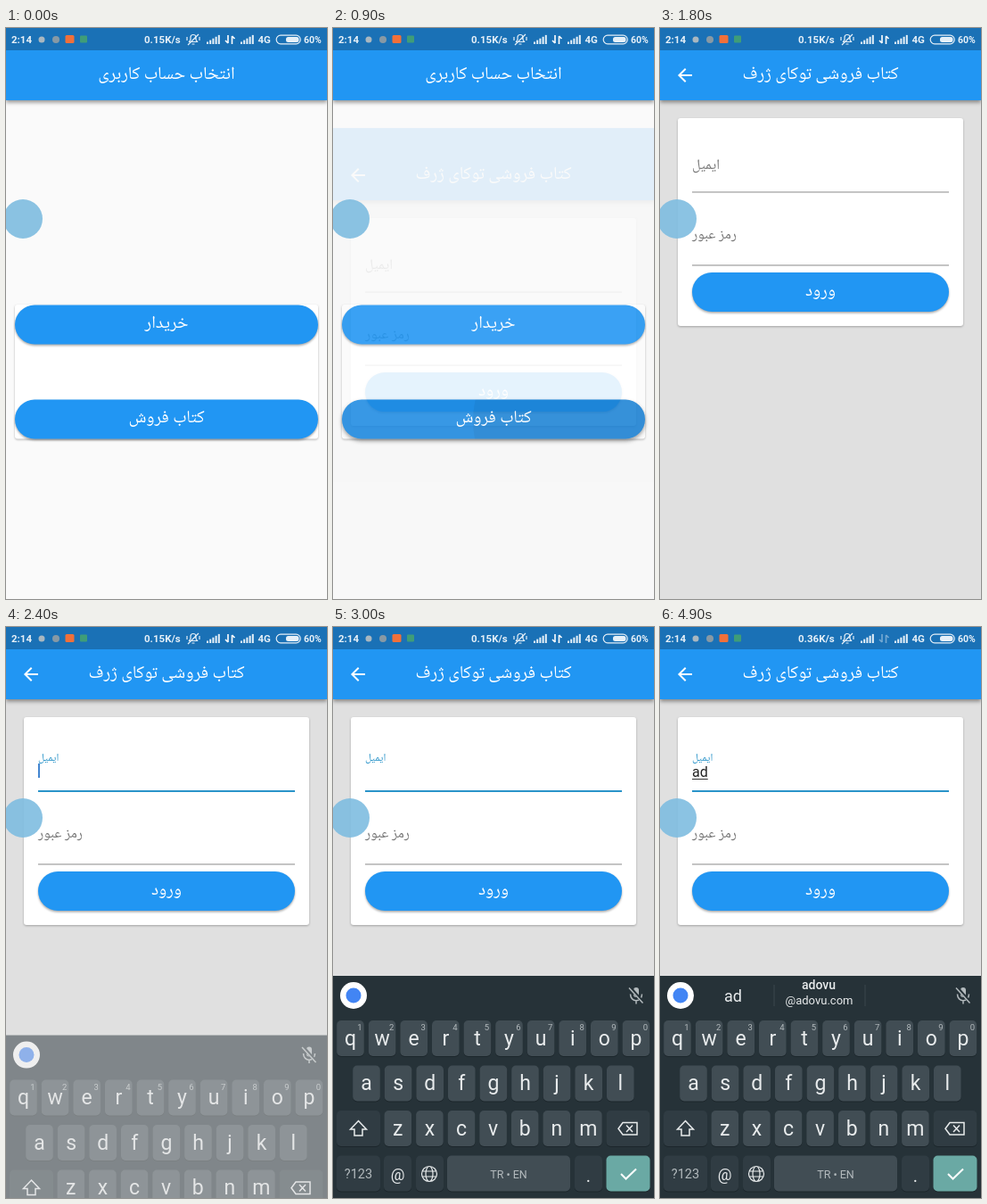
Write an HTML page that moves like this. It is 360 px wide and 640 px high and loops after 5000 ms.

```html
<!DOCTYPE html>
<html lang="fa">
<head>
<meta charset="utf-8">
<title>Login</title>
<style>
  html, body { margin: 0; width: 100%; height: 100%; overflow: hidden; background: #fafafa; }
  svg { display: block; width: 100vw; height: 100vh; }
  text { font-family: Roboto, "Noto Naskh Arabic", "Noto Sans Arabic", "Noto Sans", "DejaVu Sans", sans-serif; }
  .fa { font-family: "Noto Naskh Arabic", "Noto Sans Arabic", "Noto Sans", "DejaVu Sans", sans-serif; }
  .mid { text-anchor: middle; }
  filter { color-interpolation-filters: sRGB; }
</style>
</head>
<body>
<svg viewBox="0 0 360 640" xmlns="http://www.w3.org/2000/svg">
  <defs>
    <filter id="flat" x="-5%" y="-10%" width="110%" height="120%">
      <feDropShadow dx="0" dy="1" stdDeviation=".8" flood-opacity=".28"/>
    </filter>
    <filter id="low" x="-5%" y="-20%" width="110%" height="150%">
      <feDropShadow dx="0" dy="1.500" stdDeviation="1.300" flood-opacity=".35"/>
    </filter>
    <filter id="high" x="-5%" y="-30%" width="110%" height="180%">
      <feDropShadow dx="0" dy="2.500" stdDeviation="2.200" flood-opacity=".4"/>
    </filter>
    <clipPath id="pill"><rect x="10" y="416.500" width="340" height="44" rx="22"/></clipPath>
  </defs>

  <g id="chooser"></g>
  <g id="login"></g>
  <g id="keyboard"></g>
  <circle cx="19" cy="214" r="22" fill="#7fbde0" opacity=".9"/>
  <g id="status"></g>
</svg>
<script>
const LOOP = 5000;
const BLUE = '#2196f3', ACCENT = '#2a94c9';
const $ = id => document.getElementById(id);
const clamp = v => Math.min(1, Math.max(0, v));
const mix = (a, b, k) => a + (b - a) * k;
const during = (t, from, to) => t >= from && t < to;
const show = (id, on) => $(id).setAttribute('visibility', on ? 'visible' : 'hidden');

function bezier(x1, y1, x2, y2) {
  const at = (a, b, s) => 3 * (1 - s) ** 2 * s * a + 3 * (1 - s) * s * s * b + s ** 3;
  return x => {
    let lo = 0, hi = 1;
    for (let i = 0; i < 24; i++) {
      const m = (lo + hi) / 2;
      if (at(x1, x2, m) < x) lo = m; else hi = m;
    }
    return at(y1, y2, lo);
  };
}
const fastOutSlowIn = bezier(.4, 0, .2, 1);
const easeIn = bezier(.42, 0, 1, 1);

const rect = (x, y, w, h, fill, r = 0, extra = '') =>
  `<rect x="${x}" y="${y}" width="${w}" height="${h}" rx="${r}" fill="${fill}" ${extra}/>`;
const text = (x, y, size, fill, str, cls = '', extra = '') =>
  `<text x="${x}" y="${y}" font-size="${size}" fill="${fill}" class="${cls}" ${extra}>${str}</text>`;
const path = (d, fill, extra = '') => `<path d="${d}" fill="${fill}" ${extra}/>`;
const stroke = (d, color, width = 1.5) =>
  path(d, 'none', `stroke="${color}" stroke-width="${width}"`);

const appBar = title =>
  rect(0, 0, 360, 81, BLUE, 0, 'filter="url(#high)"') +
  text(180, 56.5, 20, '#fff', title, 'fa mid');
const card = (x, y, w, h) => rect(x, y, w, h, '#fff', 3, 'filter="url(#flat)"');
const button = (x, y, w, label, id = '', ink = '') =>
  rect(x, y, w, 44, BLUE, 22, `filter="url(#low)" id="${id}"`) + ink +
  text(x + w / 2, y + 25.5, 19.7, '#fff', label, 'fa mid');

function buildChooser() {
  const ink = `<g clip-path="url(#pill)">
    ${rect(10, 416, 340, 45, '#000', 0, 'id="press" opacity="0"')}
    <circle id="splash" cx="260" cy="440" r="0" opacity=".06"/>
  </g>`;
  $('chooser').innerHTML =
    rect(0, 0, 360, 640, '#fafafa') +
    appBar('انتخاب حساب کاربری') +
    card(10, 310, 340, 150.5) +
    button(10, 310.5, 340, 'خریدار') +
    button(10, 416.5, 340, 'کتاب فروش', 'seller', ink);
}

function buildLogin() {
  const arrow = 'M20 11H7.83l5.59-5.59L12 4l-8 8 8 8 1.41-1.41L7.83 13H20z';
  $('login').innerHTML =
    rect(0, 0, 360, 640, '#e0e0e0') +
    appBar('کتاب فروشی توکای ژرف') +
    path(arrow, '#fff', 'transform="translate(16 41)"') +
    card(20, 101, 320, 233) +
    rect(36, 183.3, 288, 1.3, '#a5a5a5') +
    rect(36, 183, 288, 2, ACCENT, 0, 'id="focusLine"') +
    `<g id="label">${text(0, 0, 16, 'currentColor', 'ایمیل', 'fa')}</g>` +
    text(36, 168, 16, '#222', '', '', 'id="typed"') +
    rect(36, 170, 0, 1, '#333', 0, 'id="compose"') +
    rect(36, 153, 2, 16, '#4285d0', 0, 'id="cursor"') +
    text(36, 236, 16, '#777', 'رمز عبور', 'fa') +
    rect(36, 265.3, 288, 1.3, '#a5a5a5') +
    button(36, 274, 288, 'ورود');
}

const KEY = '#414d54', DARK = '#303c43', INK = '#e8ebec', DIM = '#b3babd';
const PITCH = 35.6;
const keyX = (row, i) => [19.5, 37.5, 72.8][row] + i * PITCH;

function popup(id, letter, x) {
  return `<g id="${id}">${rect(x - 21, 440, 42, 92, '#56636b', 5)}${text(x, 470, 25, INK, letter, 'mid')}</g>`;
}

function buildKeyboard() {
  const key = (x, y, w, fill) =>
    rect(x, y + 1, w, 40, '#1c262b', 5) + rect(x, y, w, 40, fill, 5);
  let out = rect(0, 391, 360, 400, '#263238');
  ['qwertyuiop', 'asdfghjkl', 'zxcvbnm'].forEach((letters, row) => {
    [...letters].forEach((c, i) => {
      const x = keyX(row, i), y = 441 + row * 50.5;
      out += key(x - 15.3, y, 30.6, KEY) + text(x, y + 27.5, 23, INK, c, 'mid');
      if (!row) out += text(x + 10.5, y + 11, 9.5, DIM, (i + 1) % 10, 'mid');
    });
  });
  out += key(4, 542, 49, DARK) + key(306.5, 542, 49, DARK);
  [[4, 49, DARK], [57, 31, DARK], [93, 31, DARK], [128, 138, KEY], [271, 31, DARK], [306.5, 49, '#6aa9a4']]
    .forEach(([x, w, fill]) => out += key(x, 592.5, w, fill));
  out +=
    stroke('M28.5 553.5L37.5 563H33V570H24V563H19.5Z', INK) +
    stroke('M325 555.5H341V569H325L320 562.2ZM329 558.5L336 566M336 558.5L329 566', INK) +
    text(28.5, 618, 14.5, DIM, '?123', 'mid') +
    text(72.5, 620, 17.5, INK, '@', 'mid') +
    stroke('M99.5 613a8.5 8.5 0 1 0 17 0a8.5 8.5 0 1 0 -17 0M104 613a4 8.5 0 1 0 8 0a4 8.5 0 1 0 -8 0M100.5 610H115.5M100.5 616H115.5', INK, 1.2) +
    text(197, 618, 12.5, DIM, 'TR • EN', 'mid') +
    text(286.5, 622, 20, INK, '.', 'mid') +
    stroke('M323 613L328.5 618.5L340 607.5', '#fff', 2) +
    '<circle cx="23" cy="413" r="15" fill="#fff"/><circle cx="23" cy="413" r="8.5" fill="#4285f4"/>' +
    rect(337, 404, 6, 11, DIM, 3) +
    stroke('M333.5 411.5C333.5 421 346.5 421 346.5 411.5M340 418.5V422.5', DIM) +
    stroke('M333 404L348 421', '#263238', 3.5) + stroke('M332 404.5L347.5 421.5', DIM) +
    text(179, 420, 18, INK, 'a', 'mid', 'id="one"') +
    text(82, 420, 18, INK, 'ad', 'mid', 'id="two"') +
    `<g id="more">
       ${rect(127.5, 401, 1, 24, '#3b474d')}${rect(229.5, 401, 1, 24, '#3b474d')}
       ${text(178, 405.5, 14, INK, 'adovu', 'mid', 'font-weight="500"')}
       ${text(178.5, 422.5, 13, INK, '@adovu.com', 'mid')}
     </g>` +
    popup('popA', 'a', keyX(1, 0)) + popup('popD', 'd', keyX(1, 2));
  $('keyboard').innerHTML = out;
}

function buildStatus() {
  const bars = x => [0, 1, 2, 3, 4].map(i =>
    rect(x + i * 3.2, 15.5 - i * 1.9, 2, 2.5 + i * 1.9, '#e6f0f8')).join('');
  const label = (x, str, size = 11.5, id = '') =>
    text(x, 17, size, '#e6f0f8', str, '', `font-weight="600" id="${id}"`);
  $('status').innerHTML =
    rect(0, 0, 360, 25, '#1a71b6') +
    label(6, '2:14') +
    '<circle cx="40" cy="13" r="3.5" fill="#a9b7c0"/><circle cx="56" cy="13" r="4" fill="#8799a5"/>' +
    rect(66.5, 8, 10, 9, '#f0703a', 1.5) + rect(83, 8.5, 8, 8, '#3f9d78', 1) +
    label(155, '', 11.5, 'speed') +
    stroke('M205.5 15.5H214.5L213 13V10.5C213 6.5 207 6.5 207 10.5V13ZM208.5 18H211.5M216 7L204 19M203 10V14M217 10V14', '#e6f0f8', 1.2) +
    bars(225) + bars(263) +
    `<g id="traffic">${stroke('M249 8V17M246 14L249 17M253.5 18V9M253.5 9L256.5 12', '#fff', 1.6)}</g>` +
    label(282.5, '4G') +
    rect(303.2, 8.2, 27, 9.6, 'none', 4.8, 'stroke="#e6f0f8" stroke-width="1.2"') +
    rect(314, 10, 14.5, 6, '#e6f0f8', 2.5) +
    label(334, '60%', 10.5);
}

function setAttrs(id, attrs) {
  for (const name in attrs) $(id).setAttribute(name, attrs[name]);
}

function draw(t) {
  // button press, then the page fades upwards
  const press = clamp((t - 660) / 120);
  setAttrs('seller', { filter: press > 0 ? 'url(#high)' : 'url(#low)' });
  setAttrs('press', { opacity: .07 * press });
  setAttrs('splash', { r: 103 * clamp((t - 680) / 220) });

  const page = clamp((t - 829) / 262);
  setAttrs('login', {
    opacity: easeIn(page),
    transform: `translate(0 ${160 * (1 - fastOutSlowIn(page))})`,
    visibility: page > 0 ? 'visible' : 'hidden'
  });

  // email field
  const focus = fastOutSlowIn(clamp((t - 2150) / 200));
  setAttrs('label', {
    transform: `translate(36 ${mix(158, 149.5, focus)}) scale(${mix(1, .75, focus)})`,
    color: focus > .3 ? ACCENT : '#777'
  });
  setAttrs('focusLine', { opacity: focus });
  const typed = t < 3680 ? '' : t < 4380 ? 'a' : 'ad';
  $('typed').textContent = typed;
  const width = typed ? $('typed').getComputedTextLength() : 0;
  setAttrs('compose', { width });
  const cursorOn = during(t, 2190, 2690) || during(t, 3190, 4090) || during(t, 4380, 4880);
  setAttrs('cursor', { x: 36 + width, opacity: cursorOn ? 1 : 0 });

  // keyboard
  const rise = clamp((t - 2350) / 250);
  setAttrs('keyboard', {
    transform: `translate(0 ${105 * (1 - rise) ** 2})`,
    opacity: clamp(rise * 2.5)
  });
  show('popA', during(t, 3390, 3680));
  show('popD', during(t, 4380, 4580));
  show('one', during(t, 3690, 4580));
  show('two', t >= 4580);
  show('more', t >= 4680);

  const late = t >= 3690;
  $('speed').textContent = late ? '0.36K/s' : '0.15K/s';
  setAttrs('traffic', { opacity: late ? .4 : 1 });
}

buildChooser();
buildLogin();
buildKeyboard();
buildStatus();
const start = performance.now();
function tick() {
  draw((performance.now() - start) % LOOP);
  requestAnimationFrame(tick);
}
tick();
</script>
</body>
</html>
```
